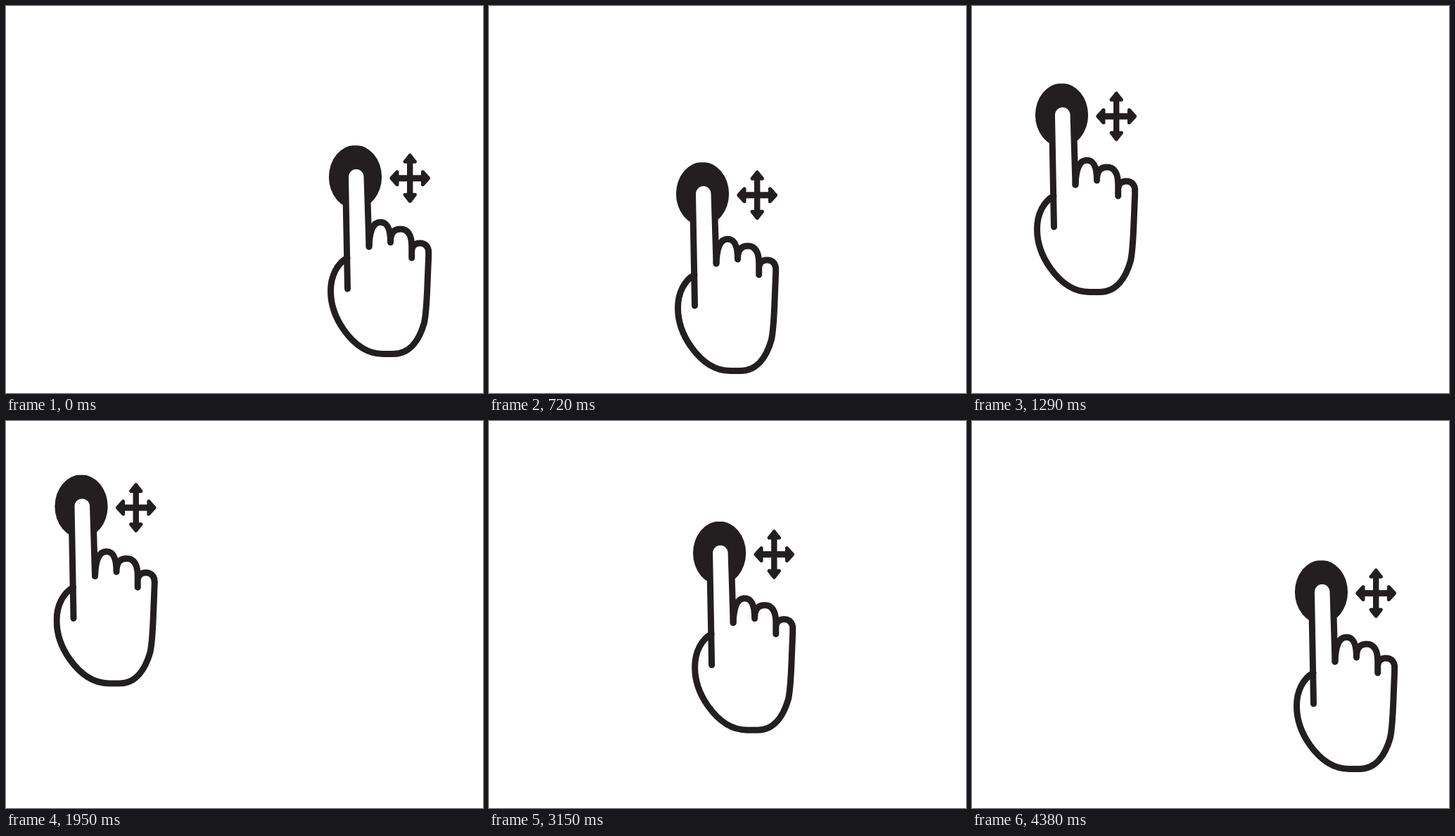
Write an HTML page with a canvas that moves like this. It is 678 by 550 pixels and loops after 4830 ms.

```html
<!DOCTYPE html>
<html lang="en">
<head>
<meta charset="utf-8">
<title>Drag gesture</title>
<style>
  html, body { margin: 0; width: 100%; height: 100%; overflow: hidden; background: #fff; }
  canvas { display: block; }
</style>
</head>
<body>
<canvas id="stage" width="678" height="550"></canvas>
<script>
const ctx = document.getElementById('stage').getContext('2d');
const LOOP = 4830, TICK = 30;
const INK = '#231f20';

// time, x, y, and velocity (px/ms) where the hand does not rest
const keys = [
  [0, 0, 0],
  [540, -123, 26, -0.37, 0.02],
  [720, -193, 24, -0.395, -0.06],
  [1080, -323, -32, -0.29, -0.24],
  [1290, -369, -88, -0.145, -0.21],
  [1530, -389.5, -122.8],
  [1920, -389.5, -122.8],
  [2430, -389.5, -3.8],
  [2700, -389.5, -3.8],
  [3570, 30, -101.6],
  [3780, 30, -101.6],
  [4380, 0, 0],
  [LOOP, 0, 0]
];

const finger = new Path2D('M485.5 402 L482.5 242.8 A15.25 15.25 0 0 1 513 242.8 L516 342');
const knuckles = new Path2D(
  'M516 342 C517 318 522 307.2 532 307.2 C542 307.2 546.5 316 546.5 336 ' +
  'M546.5 334 C547 321 553 317 561 317 C571 317 576.7 325 576.7 342 V358 ' +
  'M576.7 348 C577 340 582 337 588 337 C596 337 600.8 342 600.8 351');
const palm = new Path2D(
  'M600.8 351 L598.8 400 C598 420 597 438 594.5 450 C588 473 575 494.5 551 494.5 ' +
  'H536 C510 494.5 492 477 480 460 C468 443 461.5 426 461.5 405 C461.5 383 471 366 485 358');

function hermite(a, b, va, vb, span, p) {
  const q = p * p, c = q * p;
  return a * (2 * c - 3 * q + 1) + b * (3 * q - 2 * c) +
    span * (va * (c - 2 * q + p) + vb * (c - q));
}

function position(t) {
  const i = keys.findIndex(k => k[0] > t);
  const [t0, x0, y0, vx0 = 0, vy0 = 0] = keys[i - 1];
  const [t1, x1, y1, vx1 = 0, vy1 = 0] = keys[i];
  const span = t1 - t0, p = (t - t0) / span;
  return [hermite(x0, x1, vx0, vx1, span, p), hermite(y0, y1, vy0, vy1, span, p)];
}

function drawHand() {
  ctx.save();
  ctx.beginPath();
  ctx.rect(457, 198.2, 148.3, 301.2);
  ctx.clip();

  ctx.fillStyle = INK;
  ctx.beginPath();
  ctx.ellipse(496.5, 243, 37.6, 45.2, 0, 0, Math.PI * 2);
  ctx.fill();

  ctx.fillStyle = '#fff';
  ctx.fill(finger);
  ctx.lineWidth = 9;
  for (const path of [finger, knuckles, palm]) ctx.stroke(path);
  ctx.restore();
}

function drawHead(points) {
  ctx.beginPath();
  for (const [x, y] of points) ctx.lineTo(x, y);
  ctx.closePath();
  ctx.fill();
  ctx.stroke();
}

function drawArrows() {
  ctx.save();
  ctx.translate(574.2, 244.8);
  ctx.fillStyle = INK;
  ctx.fillRect(-4.2, -26, 8.4, 52);
  ctx.fillRect(-20, -4.5, 40, 9);
  ctx.lineWidth = 5;
  for (const s of [-1, 1]) {
    drawHead([[0, 32.6 * s], [-7.2, 23.5 * s], [7.2, 23.5 * s]]);
    drawHead([[26.4 * s, 0], [18.2 * s, -9], [18.2 * s, 9]]);
  }
  ctx.restore();
}

function render(now) {
  const t = Math.floor((now % LOOP) / TICK) * TICK;
  const [x, y] = position(t);
  ctx.fillStyle = '#fff';
  ctx.fillRect(0, 0, 678, 550);
  ctx.save();
  ctx.translate(x, y);
  ctx.strokeStyle = INK;
  ctx.lineCap = ctx.lineJoin = 'round';
  drawHand();
  drawArrows();
  ctx.restore();
}

const start = performance.now();
function loop() {
  render(performance.now() - start);
  requestAnimationFrame(loop);
}
loop();
</script>
</body>
</html>
```
